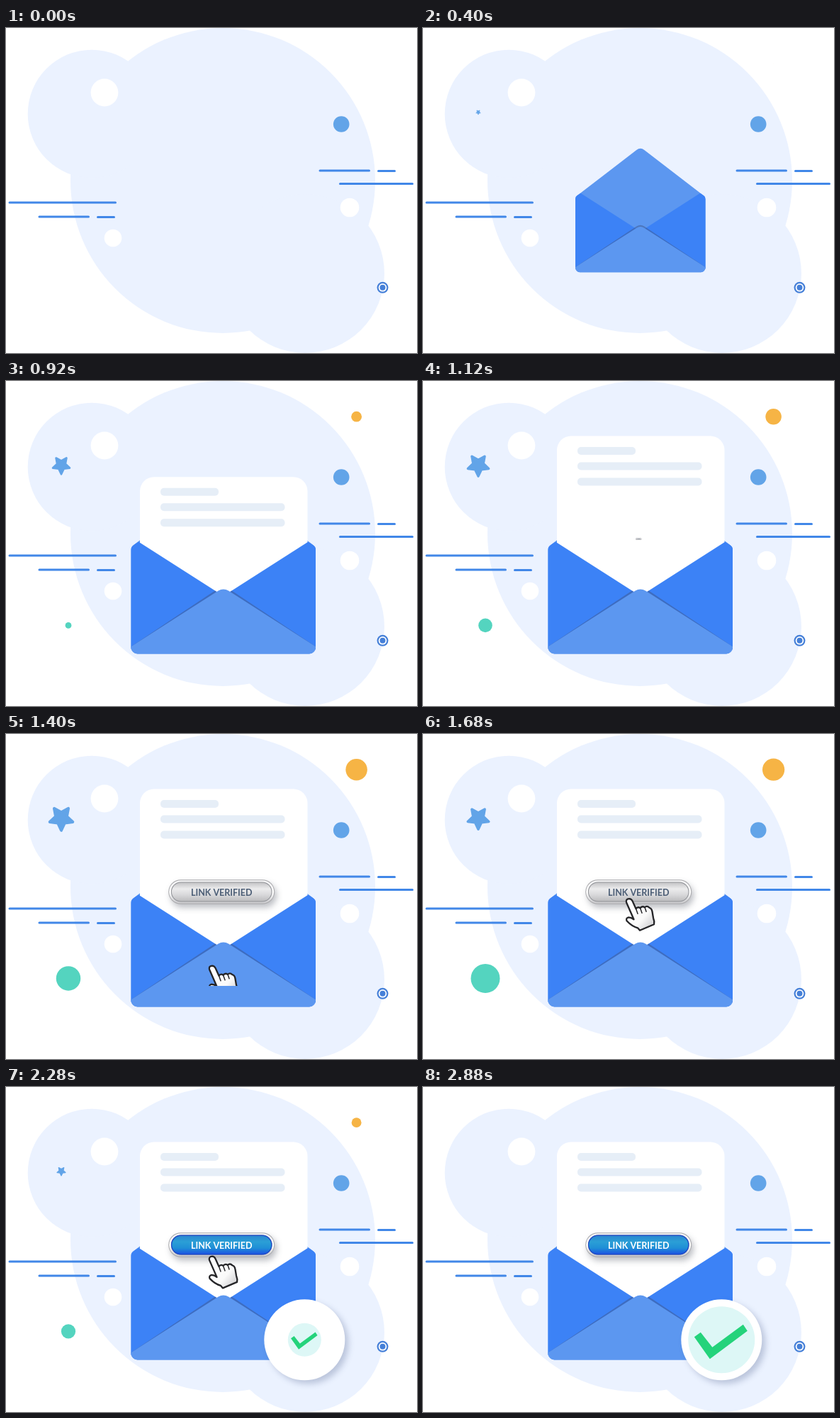
Write an HTML page with a canvas that moves like this. It is 580 px wide and 458 px high and loops after 2920 ms.

```html
<!DOCTYPE html>
<html lang="en">
<head>
<meta charset="utf-8">
<title>Link verified</title>
<style>
html, body { margin: 0; width: 100%; height: 100%; overflow: hidden; background: #fff; }
canvas { display: block; width: 580px; height: 458px; }
</style>
</head>
<body>
<canvas id="stage"></canvas>
<script>
const W = 580, H = 458, LOOP = 2920, STEP = 40;
const canvas = document.getElementById('stage');
const dpr = window.devicePixelRatio || 1;
canvas.width = W * dpr;
canvas.height = H * dpr;
const c = canvas.getContext('2d');

const SKY = '#62a4e8', LIGHT = '#5c97f0', DEEP = '#3c82f6', LINE = '#4187e8';

// eased progress of t from a to b, 0..1
function ease(t, a, b) {
  const u = Math.min(1, Math.max(0, (t - a) / (b - a)));
  return u * u * (3 - 2 * u);
}
const swell = (t, a, peak, b) => t < peak ? ease(t, a, peak) : 1 - ease(t, peak, b);

function disc(x, y, r, fill) {
  if (r <= 0) return;
  c.fillStyle = fill;
  c.beginPath();
  c.arc(x, y, r, 0, Math.PI * 2);
  c.fill();
}

function pill(x, y, w, h, r, fill) {
  c.fillStyle = fill;
  c.beginPath();
  c.roundRect(x, y, w, h, r);
  c.fill();
}

function dash(x1, x2, y) {
  pill(x1, y - 1.5, x2 - x1, 3, 1.5, LINE);
}

// closed polygon of [x, y, corner radius]
function poly(pts) {
  const n = pts.length, last = pts[n - 1];
  const path = new Path2D();
  path.moveTo((last[0] + pts[0][0]) / 2, (last[1] + pts[0][1]) / 2);
  pts.forEach(([x, y, r], i) => {
    const next = pts[(i + 1) % n];
    path.arcTo(x, y, next[0], next[1], r || 0);
  });
  path.closePath();
  return path;
}

function fill(path, style) {
  c.fillStyle = style;
  c.fill(path);
}

function scaled(x, y, s, draw) {
  if (s <= 0) return;
  c.save();
  c.translate(x, y);
  c.scale(s, s);
  draw(s);
  c.restore();
}

function vertical(y1, y2, ...colors) {
  const g = c.createLinearGradient(0, y1, 0, y2);
  colors.forEach((col, i) => g.addColorStop(i / (colors.length - 1), col));
  return g;
}

const L = 176.5, R = 437, MID = 306.8, BOT = 384.5;
const back = poly([[MID, 134, 13], [R, 234, 9], [R, BOT, 9], [L, BOT, 9], [L, 234, 9]]);
const leftSide = poly([[L, 233.5, 7], [187, 226.5, 2], [MID, 303], [L, 378]]);
const rightSide = poly([[R, 233.5, 7], [426.5, 226.5, 2], [MID, 303], [R, 378]]);
const front = poly([[MID, 291, 14], [R, 374.2], [R, BOT, 9], [L, BOT, 9], [L, 374.2]]);
const shade = poly([[MID, 287.5, 14], [R, 374.2], [L, 374.2]]);
const SHADE = 'rgba(62,88,140,.5)';

const hand = new Path2D('M1 6 Q0 1 5 .8 Q8 .8 9.5 4 L14.5 15 Q17 11.5 20.5 14 Q23 10.5 27 13 ' +
  'Q30 10 33.5 13.5 Q36.5 14 37.5 19 L39 28 Q41 33 40 37 L20 45.5 L17 42 Q9 40 1.5 32 ' +
  'Q0 28 4 27 Q8 27 11.5 30 Z');
const creases = new Path2D('M14.5 15 L17 22 M20.5 14 L23 21 M27 13 L29 19');
const tick = poly([[-38.5, -4], [-29.5, -10.5], [-13, 10.5], [30.5, -21.5], [36.5, -12.5], [-16.5, 27]]);

function scenery() {
  disc(306, 215, 215, '#ebf2ff');
  disc(121, 121, 90.3, '#ebf2ff');
  disc(422, 346, 112, '#ebf2ff');
  disc(139, 91, 19.4, '#fff');
  disc(485, 253, 13.3, '#fff');
  disc(151, 296, 12.3, '#fff');
  disc(473.2, 135.5, 11.3, SKY);
  disc(531.5, 365.8, 8, '#4680d8');
  disc(531.5, 365.8, 5.8, '#fff');
  disc(531.5, 365.8, 4, '#4680d8');
  dash(3.5, 156, 246);
  dash(45.5, 118, 266);
  dash(128, 154, 266.5);
  dash(441.5, 514, 201);
  dash(524, 550, 201.5);
  dash(470, 575, 219.5);
}

function star(x, y, r) {
  if (r < .1) return;
  c.beginPath();
  for (let i = 0; i < 10; i++) {
    const a = Math.PI * (.5 + i / 5), d = r * (i % 2 ? .43 : .88);
    c.lineTo(x + d * Math.cos(a), y + d * Math.sin(a));
  }
  c.closePath();
  c.fillStyle = c.strokeStyle = SKY;
  c.lineWidth = r * .2;
  c.lineJoin = 'round';
  c.fill();
  c.stroke();
}

function letter(t) {
  const y = 300 - 222.5 * ease(t, 580, 1090);
  if (y > 299) return;
  pill(189, y, 236.5, 372 - y, [20, 20, 0, 0], '#fff');
  const ink = '#e6eef7';
  pill(218, y + 15.5, 82, 11, 5, ink);
  pill(218, y + 37, 175.5, 11, 5, ink);
  pill(218, y + 59, 175.5, 11, 5, ink);
}

function envelope(t) {
  scaled(MID, 248, ease(t, 0, 625), () => {
    c.translate(-MID, -248);
    fill(back, LIGHT);
    fill(shade, SHADE);
    letter(t);
    for (const side of [leftSide, rightSide]) {
      fill(side, DEEP);
      c.save();
      c.clip(side);
      fill(shade, SHADE);
      c.restore();
    }
    fill(front, LIGHT);
  });
}

function button(t, press) {
  scaled(304.2, 222.5, ease(t, 1080, 1360) * press, s => {
    c.save();
    c.shadowColor = 'rgba(70,75,90,.35)';
    c.shadowBlur = 8 * s * dpr;
    c.shadowOffsetX = 3 * s * dpr;
    c.shadowOffsetY = 5 * s * dpr;
    pill(-75, -17.3, 150, 34.6, 17.3, '#a9a9ac');
    c.restore();
    pill(-74, -16.3, 148, 32.6, 16.3, vertical(-16, 16, '#f4f4f5', '#fff', '#c9c9cc'));
    pill(-71.3, -14, 142.6, 28, 14, '#8f9196');
    pill(-70.3, -13, 140.6, 26, 13, vertical(-13, 13, '#c4c4c6', '#ececed', '#d8d8da', '#bcbcbe'));
    const blue = ease(t, 1840, 1940);
    c.font = '700 12.5px Lato, sans-serif';
    c.textAlign = 'center';
    c.textBaseline = 'alphabetic';
    c.fillStyle = '#4b5d75';
    c.fillText('LINK VERIFIED', 0, 5);
    if (blue > 0) {
      c.globalAlpha = blue;
      pill(-71.3, -14, 142.6, 28, 14, '#1b47c8');
      pill(-70, -12.8, 140, 25.6, 12.8, vertical(-13, 13, '#2a86cf', '#2b9fd6', '#1f8fd6', '#1c54e2'));
      c.fillStyle = '#fff';
      c.fillText('LINK VERIFIED', 0, 5);
    }
  });
}

function cursor(t, press) {
  const y = 378 - 134 * (ease(t, 1240, 1770) - ease(t, 2160, 2700));
  if (y > 377) return;
  c.save();
  c.beginPath();
  c.rect(0, 0, W, 355);
  c.clip();
  scaled(306.5, y, press, () => {
    c.translate(-20.5, -23);
    const g = c.createLinearGradient(4, 10, 38, 40);
    g.addColorStop(0, '#fff');
    g.addColorStop(.6, '#fafafa');
    g.addColorStop(1, '#cfcfd2');
    fill(hand, g);
    c.strokeStyle = '#252528';
    c.lineJoin = c.lineCap = 'round';
    c.lineWidth = 2.3;
    c.stroke(hand);
    c.lineWidth = 1.5;
    c.stroke(creases);
  });
  c.restore();
}

function badge(t) {
  scaled(421.3, 356.3, ease(t, 1960, 2260), s => {
    c.save();
    c.shadowColor = 'rgba(60,80,125,.28)';
    c.shadowBlur = 9 * s * dpr;
    c.shadowOffsetX = c.shadowOffsetY = 5 * s * dpr;
    disc(0, 0, 57, '#fff');
    c.restore();
    scaled(0, 0, ease(t, 2080, 2480), () => {
      disc(0, 0, 47, '#ddf7f6');
      fill(tick, '#24d37b');
    });
  });
}

function draw(t) {
  c.setTransform(dpr, 0, 0, dpr, 0, 0);
  c.fillStyle = '#fff';
  c.fillRect(0, 0, W, H);
  scenery();
  star(78, 118.7, 19.5 * swell(t, 0, 1400, 2880));
  disc(494.6, 50.2, 16 * swell(t, 340, 1560, 2880), '#f6b445');
  disc(88, 344.4, 20.5 * swell(t, 600, 1670, 2880), '#54d4bf');
  const press = 1 - .12 * swell(t, 1790, 1960, 2140);
  envelope(t);
  button(t, press);
  cursor(t, press);
  badge(t);
}

const start = performance.now();
function tickFrame() {
  const t = Math.max(0, performance.now() - start) % LOOP;
  draw(Math.floor(t / STEP) * STEP);
  requestAnimationFrame(tickFrame);
}
tickFrame();
</script>
</body>
</html>
```
